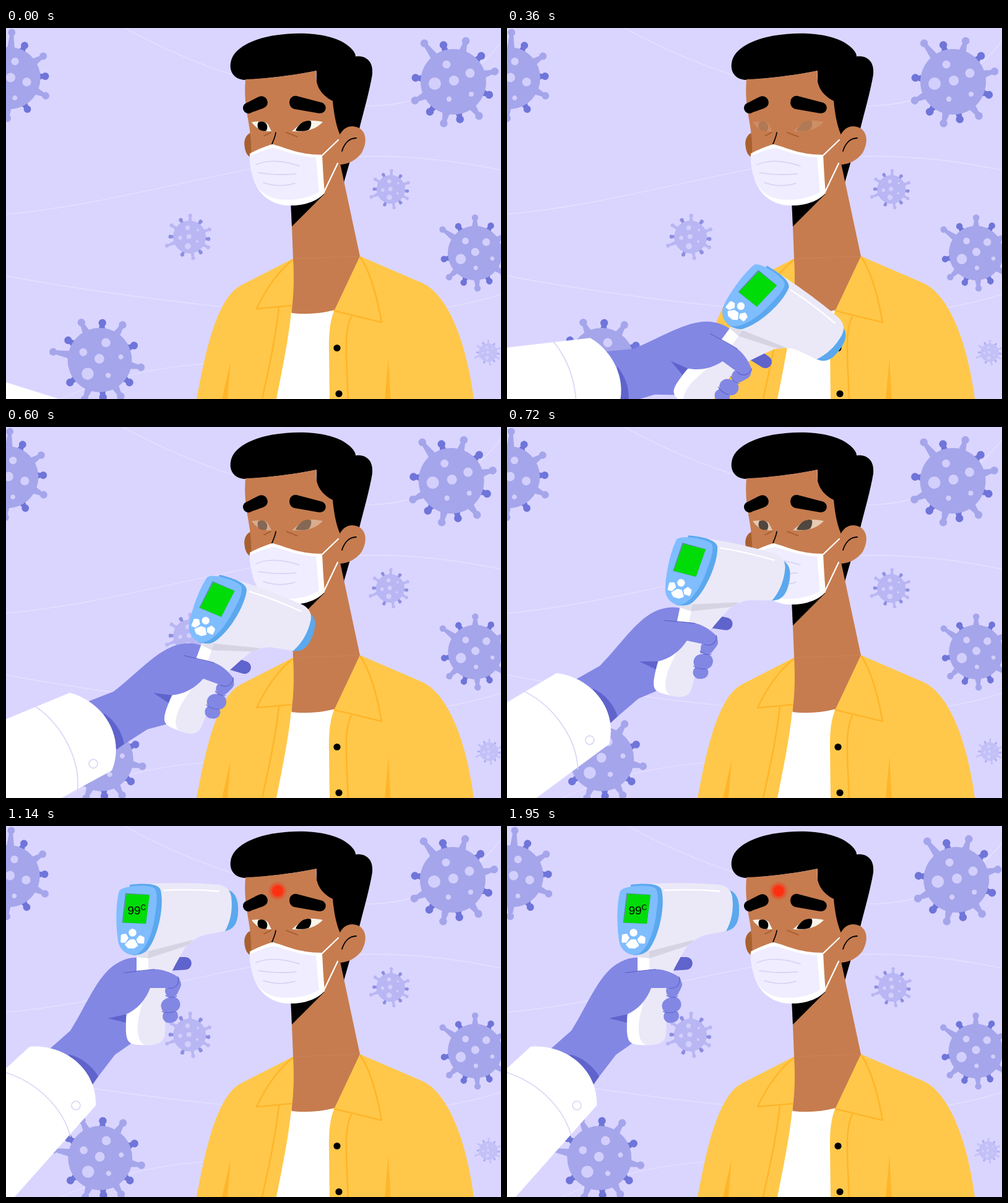
An HTML page with a canvas for the animation above (1.98 s loop, 800 by 600 pixels).

```html
<!DOCTYPE html>
<html lang="en">
<head>
<meta charset="utf-8">
<title>Temperature check</title>
<style>
html, body { margin: 0; width: 100%; height: 100%; overflow: hidden; background: #dad5ff; }
canvas { display: block; width: 800px; height: 600px; }
</style>
</head>
<body>
<canvas id="stage" width="800" height="600"></canvas>
<script>
const ctx = document.getElementById('stage').getContext('2d');
const LOOP = 1980, STEP = 30;
const SKIN = '#c67c4f', YELLOW = '#ffc84a', ORANGE = '#ffb52a';
const GLOVE = '#8287e4', GLOVE_DARK = '#5f63cc', SKY = '#7fbdff', BLUE = '#5ba8ee';

const clamp = v => Math.max(0, Math.min(1, v));

function fill(d, color) {
  ctx.fillStyle = color;
  ctx.fill(new Path2D(d));
}

function line(d, color, width, cap = 'round') {
  ctx.strokeStyle = color;
  ctx.lineWidth = width;
  ctx.lineCap = cap;
  ctx.lineJoin = 'round';
  ctx.stroke(new Path2D(d));
}

function blob(d, color, width) {
  fill(d, color);
  line(d, color, width);
}

function dot(x, y, r, color) {
  ctx.fillStyle = color;
  ctx.beginPath();
  ctx.arc(x, y, r, 0, Math.PI * 2);
  ctx.fill();
}

// horizontal sway shared by the backdrop: [time, offset]
const SWAY = [[0, 0], [240, -1], [570, -3.3], [840, -1.6], [1200, -1], [1560, -1.2], [1950, 3.2]];

function sway(t) {
  let i = 0;
  while (i < SWAY.length - 2 && t > SWAY[i + 1][0]) i++;
  const [t0, a] = SWAY[i], [t1, b] = SWAY[i + 1];
  const u = clamp((t - t0) / (t1 - t0));
  const slope = k => {
    const p = SWAY[Math.max(0, k - 1)], n = SWAY[Math.min(SWAY.length - 1, k + 1)];
    return (n[1] - p[1]) / (n[0] - p[0]) * (t1 - t0);
  };
  const u2 = u * u, u3 = u2 * u;
  return (2 * u3 - 3 * u2 + 1) * a + (u3 - 2 * u2 + u) * slope(i)
    + (3 * u2 - 2 * u3) * b + (u3 - u2) * slope(i + 1);
}

// spikes alternate light and dark
const SPIKES = [-127, -105, -73, -43, -14, 20, 53, 80, 103, 128, 154, 186];
const SPOTS = [[-11, -28, 6.5], [27, -14, 7.5], [1, -2, 8], [-30, 3, 10], [29, 20, 4], [-7, 28, 4.2]];
const NEAR = ['#a5a5eb', '#6f75d9'], FAR = ['#b8b6f3', '#8d8fe2'], FAINT = ['#c3c0f8', '#b0aeef'];

// x, y, scale, rotation, colours, share of the sway
const VIRUSES = [
  [5.5, 81, .945, 40, NEAR, 1],
  [723, 87, 1, 0, NEAR, 1],
  [151.5, 537, .98, -43, NEAR, -.7],
  [758, 364, .83, -17, NEAR, -.1],
  [622, 261, .435, -74, FAR, .33],
  [296.5, 338, .5, -74, FAR, -.05],
  [779, 525, .28, -74, FAINT, -.5]
];

function virus([x, y, scale, turn, [light, dark], share], shift) {
  ctx.save();
  ctx.translate(x + shift * share, y);
  ctx.scale(scale, scale);
  ctx.rotate(turn * Math.PI / 180);
  SPIKES.forEach((deg, i) => {
    const color = i % 2 ? dark : light;
    const len = i === 0 ? 78 : i % 2 ? 61.5 : 69;
    ctx.save();
    ctx.rotate(deg * Math.PI / 180);
    fill(`M46,-7 L${len},-2.8 V2.8 L46,7Z`, color);
    dot(len, 0, 6.3, color);
    ctx.restore();
  });
  dot(0, 0, 53, light);
  for (const [sx, sy, r] of SPOTS) dot(sx, sy, r, '#d3cffc');
  ctx.restore();
}

function backdrop(t) {
  const shift = sway(t);
  ctx.fillStyle = '#dad5ff';
  ctx.fillRect(0, 0, 800, 600);
  const pale = '#e7e3ff';
  ctx.save();
  ctx.translate(shift, 0);
  line('M192,0 C250,32 320,62 385,82 C450,110 530,126 590,126 C680,124 760,80 806,15', pale, 1.2);
  ctx.restore();
  line('M-5,301.5 C130,290 270,252 395,228 C540,202 650,198 805,231', pale, 1.2);
  line('M-5,400 C110,422 230,438 350,451 C520,480 700,464 805,429', pale, 1.2);
  line('M86,601 C150,572 230,550 320,543', pale, 1.2);
  VIRUSES.forEach(v => virus(v, shift));
}

function clothes() {
  fill('M308,600 C322,525 340,437 380,416 L464,373 L572,369 L674,413 C716,434 744,510 756,600Z', YELLOW);
  fill('M461,459 Q497,464 531,456 C524,472 522,490 522,520 L523,600 H437 C448,545 457,500 461,459Z', '#fff');
  const w = 2.6;
  line('M463,375 C440,394 421,420 405,454 L461,449', ORANGE, w);
  line('M573,371 C590,397 600,436 607,476 L531,457.5', ORANGE, w);
  line('M441,452 C436,500 425,550 414,600', ORANGE, w);
  line('M558,467 C546,490 550,530 553,600', ORANGE, w);
  fill('M363,539 L349,600 H358Z', ORANGE);
  fill('M618,533 L612,600 H621.5Z', ORANGE);
  dot(535, 517.5, 5.6, '#000');
  dot(538, 591.5, 5.6, '#000');
}

function eyes(alpha) {
  ctx.globalAlpha = alpha;
  fill('M397,152 C405,151 418,150 423,155 L429,167 C415,168 404,163 397,152Z', '#f8f4ea');
  fill('M512,152 C500,149 485,148 476,155 L462,167 C482,169 500,165 512,152Z', '#f8f4ea');
  fill('M408,152 C415,150 421,153 422,158 C423,162 421,166 420,166.5 C415,167 410,165 408,163 C406,160 406,155 408,152Z', '#000');
  fill('M474,157 C480,150 490,149 493,151 C494,157 492,162 489,165 C482,167 474,167.5 468,166 C470,161 472,159 474,157Z', '#000');
  ctx.globalAlpha = 1;
}

function mask() {
  line('M511,206 L537,181', '#fff', 2.2);
  line('M514,265 L536,219', '#fff', 2.2);
  fill('M394,203 Q411,194 430,188 C450,192 470,205 511,205 C512,225 513,245 515,267 C498,285 472,288 453,287 C424,284 408,266 401,247 C396,232 393,215 394,203Z', '#fff');
  fill('M394,208 C405,202 418,197 432,194 C450,198 475,209 501,209 C503,228 504,248 506,265 C490,275 465,280 441,277 C426,275 413,267 405,255 C398,240 394,225 394,208Z', '#efedff');
  const crease = '#d5d1f4';
  line('M404,221 C425,212 450,215 474,223', crease, 1.6);
  line('M408,234 Q438,239 469,236', crease, 1.6);
  line('M416,250 Q442,259 467,251', crease, 1.6);
}

function man(t) {
  clothes();
  // hair, neck, face
  fill('M386,84 C368,83 361,70 363,57 C366,32 400,18 430,12.5 C480,4 530,10 552,28 C561,35 565,41 565,46 C582,44 594,54 592,75 C588,100 578,135 571,163 L546,250 L500,180 L502,69 C470,76 420,82 386,84Z', '#000');
  fill('M396,169 C388,172 384,181 385.5,191 C387,203 391,208 398,210Z', '#a9602f');
  fill('M460,270 L464,373 C466,410 465,430 461.5,461 Q497,465 531,456 L572,369 L540,219 L510,230Z', SKIN);
  line('M465,373 L571,369.3', '#cc865c', .8);
  fill('M387,83 C385,105 387,125 391,147 C395,170 397,185 396,208 L440,270 L515,262 L540,219 L540,173 C534,160 530,140 528,118 C508,108 498,90 502,69 C470,76 420,82 387,83Z', SKIN);
  fill('M460,280 L462,321 L515,268Z', '#000');
  fill('M538,176 C544,160 558,155 571,162 C584,170 583,188 574,203 C565,214 553,221 537,221Z', SKIN);
  line('M543,199 C546,189 553,178 566,178', '#000', 1.8);
  // features
  fill('M408,111.5 C420,106 428,122 419,128 C412,132 402,134 394,138 C384,140 379,127 387,122 C394,119 402,114 408,111.5Z', '#000');
  fill('M470,110 L508,120 C521,122 519,139 506,138 L466,131 C454,128 456,108 470,110Z', '#000');
  line('M417,174.5 L428,169', '#a2592b', 1.5);
  line('M453,169 L471,176', '#a2592b', 1.5);
  eyes(t < 420 ? 1 - t / 420 : clamp((t - 420) / 460));
  line('M436,169 C435,177 431,184 429,190', '#000', 1.7);
  mask();
}

function heatSpot(alpha) {
  if (!alpha) return;
  const g = ctx.createRadialGradient(439, 105, 0, 439, 105, 16);
  g.addColorStop(0, '#ff2f12');
  g.addColorStop(.48, '#ff2f12');
  g.addColorStop(.62, 'rgba(255,47,18,.55)');
  g.addColorStop(1, 'rgba(255,47,18,0)');
  ctx.globalAlpha = alpha;
  dot(439, 105, 16, g);
  ctx.globalAlpha = 1;
}

function device(reading) {
  // handle and barrel
  fill('M211,205 V236 C208,268 195,288 194,315 C193,340 195,348 203,352 C211,355 224,354 232,354 L240,205Z', '#fff');
  fill('M230,200 V240 C226,270 215,300 213,320 C212,342 216,354 230,354.5 C248,354 257,348 257,333 L258,262 C262,246 272,226 291,194Z', '#ebe9f8');
  fill('M357,103 C371,106 376,120 375,140 C374,158 368,168 351,170.5Z', BLUE);
  fill('M222,94 C265,91 315,92 345,95 C357,98 362,104 364,114 C367,137 362,156 354,170 L322,176 C308,179 298,188 290,196 L226,210Z', '#ebe9f8');
  fill('M228,203 L302,184 C298,190 294,193 288,195 L230,214Z', '#d6d4e3');
  fill('M210,207 L230,203 V214 L211,212Z', '#e2e0ed');
  line('M255,104 C285,102.5 315,103 344,105.5', '#fff', 2.3);
  // rear panel
  fill('M200,95 C225,92 247,93 250,104 C256,130 246,178 229,200 C223,207 213,209 204,209Z', BLUE);
  fill('M183,105 C190,96 228,94 239,100 C247,107 243,130 240,150 C236,175 226,200 212,207 C200,212 186,203 182,190 C177,165 177,125 183,105Z', SKY);
  fill('M193,108.5 L232,111 L226,158 L187.5,156.5Z', '#5e8fa8');
  fill('M195,110 L232,111.5 L226,158 L188.5,156Z', '#00dc08');
  dot(204.5, 172.5, 6.2, '#fff');
  blob('M187.5,177 L193,176 L196,181 L192,187 L187,187Z', '#fff', 3.5);
  blob('M217,178.5 L222,181 L221.5,188.5 L214.5,188 L212.5,183.5Z', '#fff', 3.5);
  blob('M201,185 L207,185 L211.5,193 L206,196.5 L198,196 L194,191.5Z', '#fff', 3.5);
  if (reading) {
    ctx.globalAlpha = reading;
    ctx.fillStyle = '#000';
    ctx.font = '19px "Liberation Sans", Arial, sans-serif';
    ctx.fillText('99', 196.5, 143);
    ctx.font = '12px "Liberation Sans", Arial, sans-serif';
    ctx.fillText('C', 217.5, 136);
    ctx.globalAlpha = 1;
  }
}

function arm(t) {
  const seen = clamp((t - 900) / 200);
  ctx.save();
  // swings up around the elbow, off stage
  ctx.translate(-135.5, 578);
  ctx.rotate(Math.max(0, 60 - t / 15) * Math.PI / 180);
  ctx.translate(135.5, -578);

  fill('M278,212 H290 C303,213 303,231 290,232.5 L266,234Z', GLOVE_DARK);
  fill('M70,361 L104,331 C133,285 150,235 185,219 C195,214 205,212 213,213 L215,330 L206,349 L176,370 L140,417Z', GLOVE);
  fill('M100,369 C122,374 139,388 149,405 L140,418Z', GLOVE_DARK);
  device(seen);

  // thumb and fingers
  line('M263.5,308 L267.5,307', GLOVE, 21);
  line('M263,291 L269,288.5', GLOVE, 25);
  line('M252,300 Q262,304 273,300', GLOVE_DARK, 1.1);
  line('M267.5,266.5 L272.5,256', GLOVE, 21);
  line('M258,274 Q267,280 276,275', GLOVE_DARK, 1.1);
  fill('M180,240 L211,235.5 L240,231.5 C258,232 272,240 279,245 C285,253 277,264 262,262 L233,262 C226,281 212,297 193,305 L165,311Z', GLOVE);
  line('M278,244 C281,254 275,264 262,262', GLOVE_DARK, 1.2);
  line('M191,237.5 C210,235.5 225,232.5 240,232', GLOVE_DARK, 1.2);
  fill('M165,311 L194,304.5 L193.5,318Z', GLOVE_DARK);

  // sleeve
  fill('M38,357 C94,352 147,393 145,452 L-120,751 L-270,640Z', '#fff');
  line('M-6,397 C48,412 92,455 104,502', '#d8d4f6', 1.6);
  line('M106,452 a7,7 0 1 0 14,0 a7,7 0 1 0 -14,0', '#d8d4f6', 1.6);
  ctx.restore();
}

function draw(t) {
  backdrop(t);
  man(t);
  heatSpot(clamp((t - 900) / 200));
  arm(t);
}

let start;
function tick(now) {
  if (start === undefined) start = now;
  const t = (now - start) % LOOP;
  draw(Math.floor(t / STEP) * STEP);
  requestAnimationFrame(tick);
}
draw(0);
requestAnimationFrame(tick);
</script>
</body>
</html>
```
